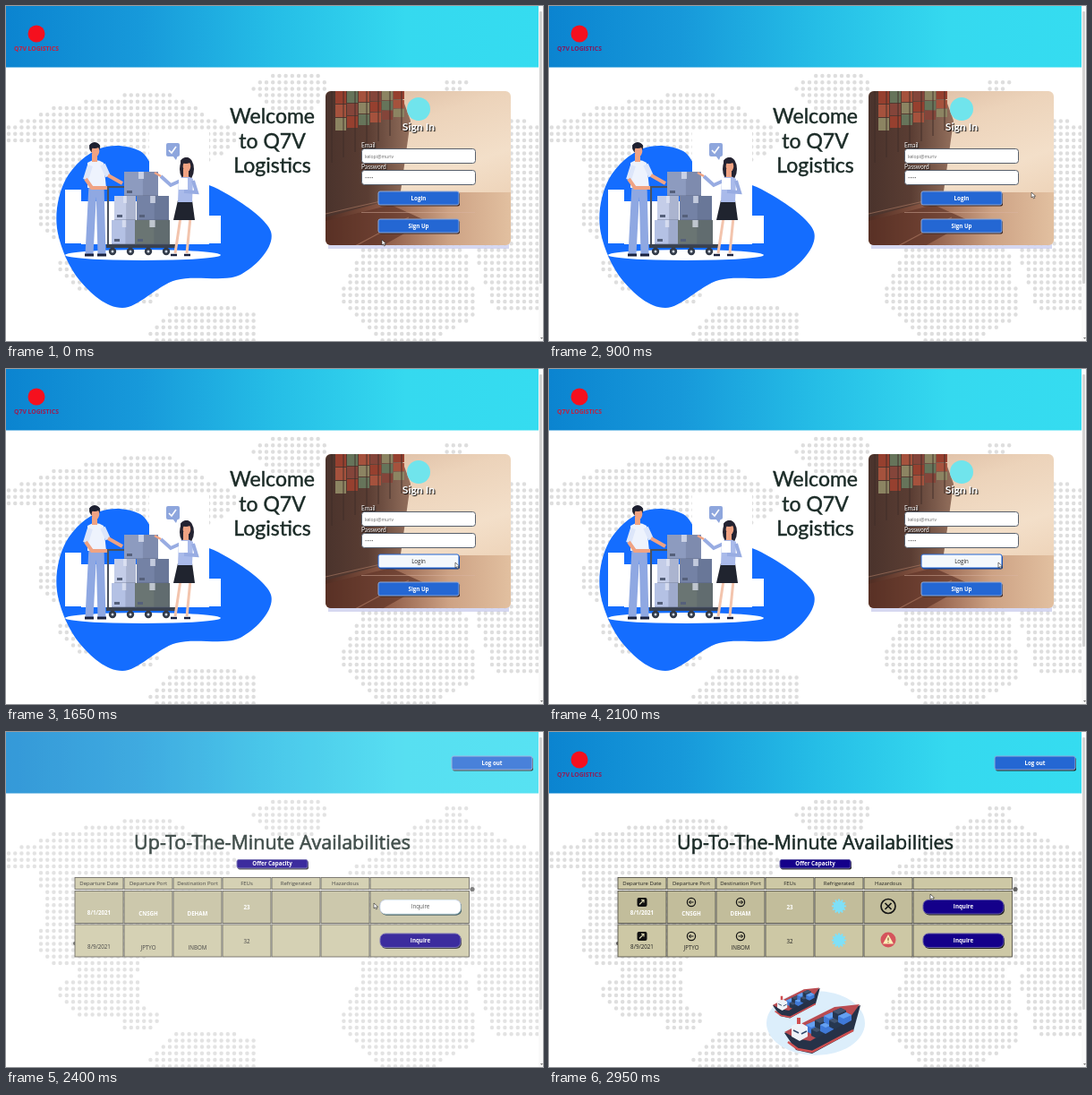
Animation, 600 px wide and 374 px high, one loop 3000 ms. Source, as an HTML page:

```html
<!DOCTYPE html>
<html lang="en">
<head>
<meta charset="utf-8">
<title>Logistics portal</title>
<style>
html, body { margin: 0; width: 100%; height: 100%; overflow: hidden; background: #fff; }
svg { display: block; width: 600px; height: 374px; }
.lato { font-family: Lato, "Open Sans", sans-serif; }
.noto { font-family: "Open Sans", "Noto Sans", sans-serif; }
.shaded { text-shadow: 1px 1px 1px #000; }
</style>
</head>
<body>
<svg id="stage" viewBox="0 0 600 374"></svg>
<script>
const LOOP = 3000, SWITCH = 2150;
const BRAND = "Q7V", BLUE = "#2467d3", NAVY = "#14008a", INK = "#1b2b27", SKIN = "#f0a383";
const BOLD = 'font-weight="700"';

const range = n => [...Array(n).keys()];
const each = (n, draw) => range(n).map(draw).join("");
const rect = (x, y, w, h, fill, extra = "") =>
  `<rect x="${x}" y="${y}" width="${w}" height="${h}" fill="${fill}" ${extra}/>`;
const ellipse = (x, y, rx, ry, fill, extra = "") =>
  `<ellipse cx="${x}" cy="${y}" rx="${rx}" ry="${ry}" fill="${fill}" ${extra}/>`;
const circle = (x, y, r, fill, extra) => ellipse(x, y, r, r, fill, extra);
const path = (d, fill, extra = "") => `<path d="${d}" fill="${fill}" ${extra}/>`;
const line = (d, stroke, width = 1, extra = "") =>
  path(d, "none", `stroke="${stroke}" stroke-width="${width}" ${extra}`);
const text = (x, y, size, str, fill, extra = "", font = "noto") =>
  `<text class="${font}" x="${x}" y="${y}" font-size="${size}" fill="${fill}" ${extra}>${str}</text>`;
const mid = (x, y, size, str, fill, extra = "", font) =>
  text(x, y, size, str, fill, `text-anchor="middle" ${extra}`, font);
const group = (id, body) => `<g id="${id}">${body}</g>`;

function button(x, y, w, h, label, fill, { r = 2, edge = "#8fa9d8", shadow = "#3a2420", ink = "#fff" } = {}) {
  return rect(x + 1, y + 1.5, w, h, shadow, `rx="${r}"`) +
    rect(x, y, w, h, fill, `rx="${r}" stroke="${edge}"`) +
    mid(x + w / 2, y + h / 2 + 2.2, 6.2, label, ink, ink === "#fff" ? BOLD : "");
}

// Closed Catmull-Rom curve through a few points
function smooth(points) {
  const n = points.length, at = i => points[(i + n) % n];
  return `M${at(0)}` + each(n, i => {
    const [a, b, c, d] = [-1, 0, 1, 2].map(k => at(i + k));
    const c1 = b.map((v, k) => v + (c[k] - a[k]) / 6);
    const c2 = c.map((v, k) => v - (d[k] - b[k]) / 6);
    return `C${c1} ${c2} ${c}`;
  }) + "Z";
}

// World map: a dot grid kept where it falls on wobbly oval continents
function worldMap() {
  const lands = [
    [140, 148, 112, 50], [28, 140, 34, 14], [108, 215, 74, 60], [105, 292, 46, 28], [148, 320, 24, 15],
    [225, 364, 60, 32], [318, 94, 40, 24], [502, 88, 14, 7], [500, 185, 115, 84], [452, 310, 72, 74], [575, 290, 46, 56]];
  const onLand = (x, y) => lands.some(([cx, cy, rx, ry]) => {
    const dx = (x - cx) / rx, dy = (y - cy) / ry;
    return Math.hypot(dx, dy) < 1 + .08 * Math.sin(5 * Math.atan2(dy, dx) + cx);
  });
  let d = "";
  for (let y = 78; y < 374; y += 7.2)
    for (let x = 3; x < 594; x += 7.2)
      if (onLand(x, y)) d += `M${x.toFixed(1)} ${y.toFixed(1)}h0`;
  return line(d, "#dedede", 4.5, 'stroke-linecap="round"');
}

const header = rect(0, 0, 595, 68.5, "url(#bar)");
const logo = circle(34, 31, 9.5, "#f5101e") + mid(34, 50, 6.8, BRAND + " LOGISTICS", "#c81e3c", BOLD);

function carton(x, y, w, fill) {
  return rect(x, y, w, 27, fill) + rect(x + w * .55, y, w * .45, 27, "#38435f", 'opacity=".18"') +
    rect(x + w * .42, y, w * .16, 8, "#e4e9f5", 'opacity=".7"') +
    rect(x + 3, y + 21, 6, 3, "#55607a") + line(`M${x} ${y + 27}h${w}`, "#4d5872", .6);
}

function person(x, y, hair) {
  return rect(x - 3, y + 4, 6, 9, SKIN) + ellipse(x, y - 3, 6, 6, hair) + ellipse(x + 1, y + 1, 4.3, 6, SKIN) +
    ellipse(x, y - 5, 6, 3, hair);
}

function delivery() {
  const blob = path(smooth([[67, 193], [105, 159], [150, 162], [178, 198], [232, 202], [296, 252],
    [262, 300], [190, 306], [130, 337], [82, 306], [57, 248]]), "#146dff");
  const skyline = rect(66, 205, 18, 60, "#fff") + rect(84, 218, 76, 48, "#fff") +
    rect(160, 140, 67, 126, "#fff") + rect(227, 234, 13, 31, "#fff") + ellipse(153, 278, 87, 6, "#fff");
  const man = line("M97 200L93 277M105 200L107 277", "#8fa8e2", 9) +
    line("M88 278h10m4 0h10", "#1b2340", 3) +
    path("M91 175Q100 169 109 175L112 203H91Z", "#eef3fd") +
    line("M94 178L89 194M108 177L114 190", "#dde6fa", 6) +
    line("M89 193L96 203 114 203M114 189L130 198", SKIN, 4) + person(99, 161, "#1d2030");
  const cart = line("M134 202H114V266", "#4a5260", 2) + rect(112, 266, 77, 4, "#39414f") +
    each(4, i => circle(119 + i * 20, 274, 4.2, "#323a48") + circle(119 + i * 20, 274, 1.5, "#cfd6e2"));
  const boxes = carton(132, 185, 38, "#8d9bbf") + carton(121, 212, 24, "#c4cde8") + carton(146, 212, 36, "#7482a5") +
    carton(118, 239, 28, "#b4c1e4") + carton(144, 239, 39, "#6a7573");
  const woman = line("M195 236L189 276M206 236L202 276", "#f3c4ad", 3) +
    line("M184 278h7m8 0h7", "#1b2340", 2.5) +
    ellipse(202, 182, 8, 13, "#242331") +
    path("M192 217H208L211 239H187Z", "#20242f") +
    path("M193 193Q201 187 209 193L208 219H192Z", "#a9baea") +
    line("M195 195L184 200 173 190M209 195L213 208 199 207", "#98ace2", 4) +
    line("M173 190L166 186", SKIN, 2.5) + rect(193, 192, 10, 13, "#fff") + person(201, 178, "#242331");
  const bubble = rect(179, 153, 15, 15, "#8ea6dd", 'rx="2"') + path("M186 167h6l-2 5Z", "#8ea6dd") +
    line("M182 161l3 3 5-7", "#fff", 1.6);
  return blob + skyline + man + cart + boxes + woman + bubble;
}

function harbour() {
  const paint = ["#96402f", "#66745a", "#a5523d", "#84453a", "#8c8462"];
  const containers = each(18, i => {
    const col = i % 6, row = (i - col) / 6;
    return rect(368 + col * 13, 95 + row * (15 - col), 12, 14 - col, paint[(row * 2 + col) % 5]);
  });
  const lashings = each(7, i => line(`M${364 + i * 13} 95v${80 - i * 6}`, "#3f2d2a", .9));
  return `<g clip-path="url(#card)">` + rect(357, 95, 207, 173, "url(#sky)") +
    rect(357, 208, 207, 60, "url(#quay)") +
    path("M357 95H440L452 128 440 214 357 236Z", "url(#hull)") + containers + lashings +
    path("M357 240L430 222 470 240 420 268H357Z", "#5e3327", 'opacity=".65"') +
    line("M390 268L450 236M357 232L445 212", "#c08a70", 1.2, 'opacity=".5"') + "</g>";
}

function field(y, label, value) {
  return text(397, y - 1.7, 6.6, label, "#fff", "", "lato shaded") +
    rect(397.5, y, 127, 16, "#fff", 'rx="3" stroke="#58606c"') + text(401, y + 10, 5, value, "#666");
}

function loginPage() {
  const heading = ["Welcome", "to " + BRAND, "Logistics"].map((s, i) =>
    mid(297.5, 131 + i * 27.7, 23, s, INK, `stroke="${INK}" stroke-width=".45"`, "lato")).join("");
  return delivery() + heading +
    rect(360, 266, 202, 5, "#b4b9e6", 'opacity=".55"') + harbour() + circle(461, 115, 13, "#70e4ec") +
    mid(461, 139, 12.2, "Sign In", "#fff", BOLD, "lato shaded") +
    field(159.5, "Email", "kelopi@muriv") + field(183.5, "Password", "•••••") +
    group("login", button(416, 207, 90, 15, "Login", BLUE)) +
    group("loginHover", button(416, 207, 90, 15, "Login", "#f4f8fc", { edge: BLUE, shadow: "#123d88", ink: "#222" })) +
    line("M397 230.5H524", "#d9b3a3", .8, 'opacity=".6"') +
    button(416, 238, 90, 15, "Sign Up", BLUE);
}

const COLUMN = 55;
const left = i => 76.5 + i * COLUMN;
const centre = i => left(i) + COLUMN / 2;

function cells(y, h, fill) {
  return each(7, i => rect(left(i) + .5, y, (i < 6 ? COLUMN : 111.5) - 1, h, fill, 'stroke="#55534a" stroke-width=".9"'));
}

function tableRow(y, [date, from, to, count], fill, ink, weight) {
  const cell = (i, drop, s) => mid(centre(i), y + drop, 6.2, s, ink, weight);
  return cells(y, 36, fill) + cell(0, 26.5, date) + cell(1, 27.5, from) + cell(2, 27.5, to) + cell(3, 20.5, count);
}

function arrowIcon(x, y, dir) {
  return circle(x, y, 4.6, "none", 'stroke="#111" stroke-width="1.2"') +
    line(`M${x - 2.5 * dir} ${y}h${5 * dir}m${-2 * dir} -2l${2 * dir} 2l${-2 * dir} 2`, "#111");
}

function snowflake(x, y) {
  const spokes = each(12, i => `M${x} ${y}l${8 * Math.cos(i * Math.PI / 6)} ${8 * Math.sin(i * Math.PI / 6)}`);
  return circle(x, y, 6.3, "#7fe0f7") + line(spokes, "#7fe0f7", 2);
}

function rowIcons(y) {
  return rect(98.5, y - 5, 11, 10, "#111", 'rx="2"') + line(`M101 ${y + 2.5}l5-5m-3 0h3v3`, "#d8d4b0", 1.1) +
    arrowIcon(centre(1), y, -1) + arrowIcon(centre(2), y, 1) + snowflake(centre(4), y + 4.5);
}

function hazards(x) {
  return circle(x, 194.5, 8, "none", 'stroke="#161616" stroke-width="1.7"') +
    line(`M${x - 3.5} 191l7 7m0-7l-7 7`, "#161616", 1.7) +
    circle(x, 232, 8.5, "#d5545c") + path(`M${x} 226l6 10.5h-12Z`, "#fbeeb6") +
    line(`M${x} 229.5v3.5m0 1.2v1`, "#7c4a2d", 1.1);
}

function boat() {
  const cargo = each(8, i => {
    const x = 287 + (i >> 1) * 10 + i % 2 * 6, y = 327 - (i >> 1) * 5 + i % 2 * 5;
    const dark = (i + (i >> 1)) % 2;
    return path(`M${x} ${y}l9-4 6 3v6l-9 5-6-3Z`, dark ? "#263750" : "#3f79d8") +
      path(`M${x} ${y}l9-4 6 3-9 4Z`, dark ? "#41536f" : "#65a0f0");
  });
  return path("M263 336L276 355 294 359 340 334 348 305Z", "#263248") +
    line("M267 346L278 354 294 357 340 333", "#d04f50", 2.5) +
    path("M263 335L319 307 347 304 337 318 292 345 276 342Z", "#b94c52") + cargo +
    path("M271 328l9-4 9 5v11l-9 5-9-5Z", "#eef3f8") +
    line("M273 333l6 3M282 337l6-3", "#32496b", 1.5) + rect(277, 319, 4, 7, "#d04f50");
}

function listPage() {
  const titles = ["Departure Date", "Departure Port", "Destination Port", "FEUs", "Refrigerated", "Hazardous"];
  const dark = { edge: "#655ca8", shadow: "#222" };
  const inquire = (y, fill, style) => button(418, y, 90, 15.5, "Inquire", fill, { r: 6, ...style });
  return button(498, 27, 90, 15, "Log out", BLUE, { shadow: "#222" }) +
    mid(297.5, 130.5, 21.5, "Up-To-The-Minute Availabilities", INK, `stroke="${INK}" stroke-width=".6"`) +
    button(258, 142.5, 79, 9.5, "Offer Capacity", NAVY, dark) +
    circle(521, 175.5, 2.6, "#666") + circle(77, 236, 2, "#555") +
    cells(162.5, 13, "#cdc8a5") + titles.map((s, i) => mid(centre(i), 171.2, 6, s, "#222")).join("") +
    tableRow(177.5, ["8/1/2021", "CNSGH", "DEHAM", "23"], "#c2bd9b", "#fff", BOLD) +
    tableRow(215, ["8/9/2021", "JPTYO", "INBOM", "32"], "#cdc8a5", "#222", "") +
    inquire(187.5, NAVY, dark) + inquire(225, NAVY, dark) +
    group("inquireHover", inquire(187.5, "#fff", { edge: "#d5e4ea", shadow: "#2d5660", ink: "#333" })) +
    group("icons", rowIcons(190) + rowIcons(228) + hazards(centre(5))) +
    group("ships", ellipse(298, 325, 55, 36, "#dceefb") +
      `<g transform="translate(87 97) scale(.62)">${boat()}</g>` + boat());
}

const gradient = (id, colours, x2, y2) => `<linearGradient id="${id}" x2="${x2}" y2="${y2}">` +
  colours.map((c, i) => `<stop offset="${i / (colours.length - 1)}" stop-color="${c}"/>`).join("") + "</linearGradient>";
const $ = id => document.getElementById(id);

$("stage").innerHTML = "<defs>" +
  gradient("bar", ["#0b84d0", "#1799da", "#25bde6", "#35d9ef", "#35dcf0"], 1, 0) +
  gradient("sky", ["#d9b79d", "#ecd3ba", "#f3dfc9", "#ecd0b4"], .4, 1) +
  gradient("quay", ["#4f2c22", "#8f5c48", "#cda284", "#e2c0a0"], 1, 0) +
  gradient("hull", ["#4a332c", "#5a3d33", "#94705d"], 1, 0) +
  `<clipPath id="card">${rect(357, 95, 207, 172, "#fff", 'rx="6"')}</clipPath></defs>` +
  rect(0, 0, 600, 374, "#fff") +
  group("page", header + worldMap() + group("logo", logo) +
    group("signIn", loginPage()) + group("listing", listPage())) +
  rect(595, 0, 5, 374, "#fafafa") + rect(596, 6, 3, 304, "#d2d2d2", 'rx="1"') +
  path("M597 370h3l-1.5 2Z", "#777") +
  group("cursor", path("M0 0L0 6 1.5 4.8 2.6 7 3.7 6.4 2.7 4.4 4.6 4.2Z", "#fff", 'stroke="#222" stroke-width=".6"'));

const brand = document.querySelector("#logo text");
const TRAVEL = 300;
const visits = [
  { at: 0, x: 420, y: 261 }, { at: 850, x: 539, y: 208 }, { at: 1600, x: 502, y: 216 },
  { at: 2400, x: 411, y: 191 }, { at: 2850, x: 426, y: 181 }];

const ramp = (t, from, to) => Math.max(0, Math.min(1, (t - from) / (to - from)));
const ease = k => k * k * (3 - 2 * k);
const show = (id, on) => $(id).setAttribute("opacity", +on);

function cursorAt(t) {
  let { x, y } = visits[0];
  for (const stop of visits.slice(1)) {
    const k = ease(ramp(t, stop.at - TRAVEL, stop.at));
    x += (stop.x - x) * k;
    y += (stop.y - y) * k;
  }
  return { x, y };
}

function draw(t) {
  const listing = t >= SWITCH;
  const { x, y } = cursorAt(t);
  const overLogin = x > 416 && x < 506 && y > 207 && y < 222;
  show("signIn", !listing);
  show("listing", listing);
  show("page", listing ? .83 + .17 * ramp(t, 2400, 2650) : 1);
  show("logo", !listing || t >= 2600);
  show("login", !overLogin);
  show("loginHover", overLogin);
  show("inquireHover", 1 - ramp(t, 2450, 2700));
  show("icons", t >= 2500);
  show("ships", t >= 2850);
  $("cursor").setAttribute("transform", `translate(${x} ${y})`);
  const tint = (1 - Math.cos(t / 2250 * 2 * Math.PI)) / 2;
  brand.setAttribute("fill", `rgb(${200 - 75 * tint},${30 - 5 * tint},${60 + 35 * tint})`);
}

const start = performance.now();
function tick() {
  draw((performance.now() - start) % LOOP);
  requestAnimationFrame(tick);
}
tick();
</script>
</body>
</html>
```
